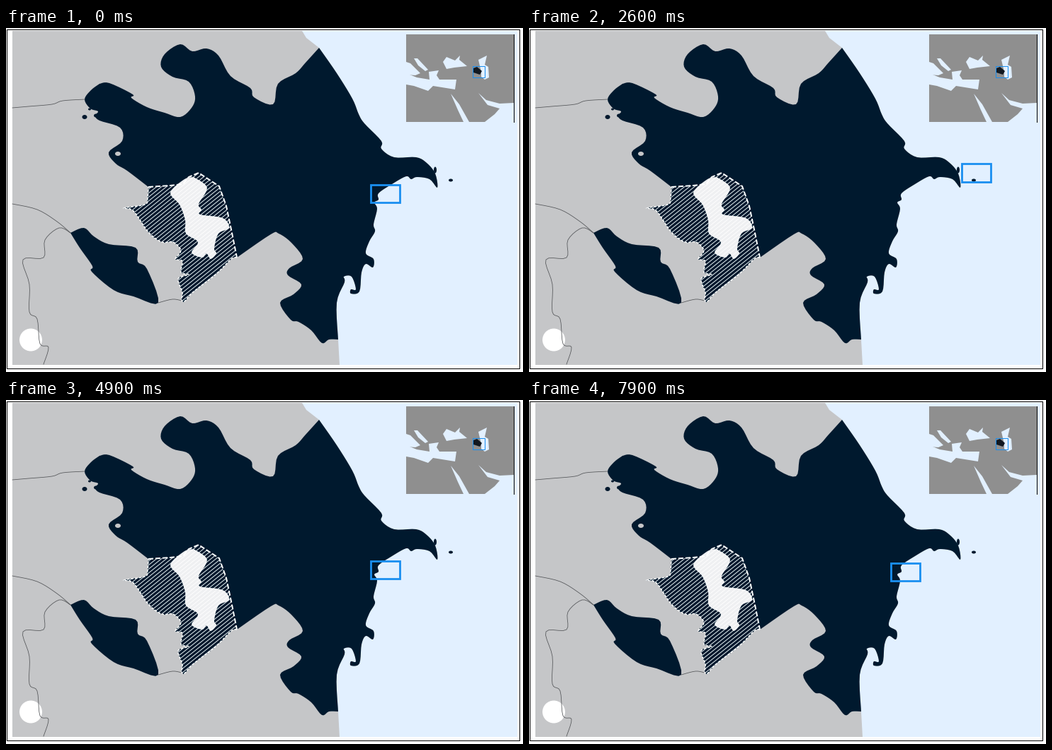
Animation, 730 px wide and 487 px high, one loop 8 s. Source, as a matplotlib script:

```python
import matplotlib.pyplot as plt
import numpy as np
from matplotlib.animation import FuncAnimation
from matplotlib.patches import Circle, Ellipse, Polygon, Rectangle

W, H, DPI = 730, 487, 100
FRAMES, STEP = 80, 100
PX = 72 / DPI

SEA, LAND, NAVY = "#e2f0ff", "#c5c6c8", "#00192e"
PALE, BLUE, GREY = "#eff0f2", "#1a8ff0", "#8f8f8f"


def curve(points, n=5):
    """Catmull-Rom curve through the points."""
    p = np.array([points[0], *points, points[-1]], float)
    t = np.linspace(0, 1, n, endpoint=False)[:, None]
    parts = []
    for a, b, c, d in zip(p, p[1:], p[2:], p[3:]):
        parts.append(b + 0.5 * t * (c - a + t * (2 * a - 5 * b + 4 * c - d
                                                 + t * (3 * (b - c) + d - a))))
    return [tuple(q) for q in np.vstack(parts + [p[-1:]])]


def ring(points):
    return curve(points + points[:1])


EAST = curve([(442, 28), (467, 64), (489, 100), (498, 122), (506, 135),
              (530, 160), (530, 171), (548, 183), (579, 183), (594, 191),
              (606, 206), (609, 226), (598, 214), (580, 211), (572, 214),
              (565, 210), (545, 221), (526, 234), (526, 243), (520, 247),
              (524, 256), (519, 278), (521, 288), (513, 302), (508, 319),
              (519, 327), (518, 339), (508, 334), (502, 346), (499, 373),
              (487, 376), (487, 370), (494, 370), (488, 352), (477, 352),
              (478, 360), (467, 389), (469, 441)])
SOUTH = curve([(469, 441), (456, 441), (446, 446), (431, 428), (413, 416),
               (402, 413), (387, 389), (406, 377), (417, 363), (398, 350),
               (400, 340), (419, 327), (403, 304), (385, 291), (374, 292),
               (326, 325)])
HATCH_EDGE = curve([(326, 325), (318, 327), (296, 349), (264, 374), (252, 387),
                    (248, 385), (249, 374), (243, 355), (258, 349), (247, 346),
                    (249, 330), (239, 327), (247, 315), (236, 303), (220, 303),
                    (201, 289), (180, 259), (166, 255), (196, 250), (200, 241),
                    (201, 225)])
WEST = curve([(201, 225), (171, 202), (155, 192), (145, 176), (164, 160),
              (161, 141), (132, 131), (126, 124), (130, 118), (119, 114),
              (111, 101), (120, 88), (132, 79)])
NORTH = curve([(132, 79), (146, 78), (179, 94), (177, 99), (199, 112), (224, 120),
               (246, 126), (262, 113), (267, 97), (258, 76), (235, 69), (219, 55),
               (224, 37), (246, 23), (263, 33), (283, 29), (300, 39), (317, 68),
               (345, 85), (350, 98), (377, 108), (384, 79), (409, 64), (423, 49),
               (442, 28)])
EXCLAVE = ring([(91, 290), (110, 283), (124, 295), (145, 306), (183, 311),
                (186, 331), (199, 341), (215, 389), (180, 380), (152, 371),
                (121, 345), (122, 337), (104, 311)])
ENCLAVE = ring([(265, 211), (284, 226), (272, 249), (276, 257), (274, 264),
                (306, 269), (315, 283), (300, 291), (294, 312), (297, 319),
                (289, 327), (283, 319), (277, 325), (262, 318), (271, 303),
                (254, 291), (253, 272), (245, 250), (232, 233), (252, 214)])
DASHED = [(201, 225), (232, 223), (250, 221), (258, 211), (272, 205), (301, 224),
          (311, 252), (319, 290), (326, 325)]

fig = plt.figure(figsize=(W / DPI, H / DPI), dpi=DPI, facecolor="white")
ax = fig.add_axes([0, 0, 1, 1])
ax.set(xlim=(0, W), ylim=(H, 0))
ax.axis("off")


def area(points, color):
    return ax.add_patch(Polygon(points, fc=color, lw=0))


def line(points, color, width, **kw):
    return ax.plot(*zip(*points), color=color, lw=width * PX, **kw)[0]


def box(x0, y0, x1, y1, fill="none", edge="none", width=0):
    return ax.add_patch(Rectangle((x0, y0), x1 - x0, y1 - y0, fc=fill, ec=edge,
                                  lw=width * PX, joinstyle="miter"))


def spot(x, y, w, h, color=NAVY):
    ax.add_patch(Ellipse((x, y), w, h, fc=color, lw=0))


def border(*points):
    line(curve(points), "#55575a", 0.8)


def draw_map():
    box(0.5, 1.5, 724.5, 481.5, edge="black", width=1)
    box(9, 4, 722, 477, SEA)
    area([(9, 4), (418, 4), (424, 14)] + EAST + [(471, 477), (9, 477)], LAND)
    border((9, 113), (32, 111), (65, 108), (80, 103), (111, 101))
    border((9, 249), (44, 257), (72, 274), (91, 290))
    border((91, 290), (75, 283), (55, 300), (53, 325), (24, 328), (33, 363),
           (33, 402), (44, 412), (48, 447), (60, 452), (53, 476))
    border((215, 389), (235, 384), (248, 386))
    area(EAST + SOUTH + HATCH_EDGE + WEST + NORTH, NAVY)
    area(EXCLAVE, NAVY)
    spot(111, 126, 7, 6)
    spot(118, 115, 4, 3)
    spot(127, 124, 6, 5)
    spot(158, 178, 8, 6, LAND)
    spot(606, 201, 4, 9)
    spot(628, 215.5, 6, 4)


def draw_hatched_zone():
    zone = area(HATCH_EDGE + DASHED, NAVY)
    for c in np.arange(330, 650, 5.6):
        line([(150, c - 100), (340, c - 252)], "white", 0.9).set_clip_path(zone)
    line(HATCH_EDGE, "white", 1.4, ls=(0, (2.5, 1.5)))
    line(DASHED, "white", 2, ls=(0, (3.5, 1.5)), dash_capstyle="butt")
    area(ENCLAVE, PALE)


def draw_inset():
    frame = box(565, 9, 717, 133, GREY)

    def sea(*points):
        area(points, SEA).set_clip_path(frame)

    sea((565, 64), (580, 70), (598, 73), (597, 62), (611, 60), (608, 67),
        (612, 73), (636, 73), (634, 87), (603, 82), (596, 89), (576, 82), (565, 80))
    sea((565, 48), (571, 50), (585, 64), (578, 67), (565, 66))
    sea((576, 43), (581, 43), (596, 59), (592, 61), (582, 53))
    sea((617, 48), (622, 41), (634, 46), (641, 39), (640, 45), (651, 54),
        (633, 56), (622, 58))
    sea((667, 45), (679, 39), (676, 52), (681, 55), (682, 70), (676, 73),
        (671, 69), (671, 62))
    sea((628, 93), (640, 108), (654, 133), (646, 133), (638, 116))
    sea((667, 92), (678, 102), (697, 107), (717, 106), (717, 133), (676, 133),
        (690, 122), (697, 114), (680, 109))
    line([(716.5, 9), (716.5, 133)], "black", 1)
    area([(660, 57), (665, 55), (672, 61), (669, 66), (660, 63)], "#111820")
    box(658.5, 53.5, 675.5, 69.5, edge=BLUE, width=1)


draw_map()
draw_hatched_zone()
draw_inset()
ax.add_patch(Circle((35, 441.5), 16, fc="white", lw=0))

# Orbit angle in degrees, clockwise on screen, with short rests.
KEYS = [0, 1, 10, 15, 19, 26, 28, 29, 38, 40, 49, 61, 65, 68, 69, 78, 79]
ANGLES = [113.6, 113.6, 350, 481.8, 602, 720, 792, 792, 1011, 1139, 1551.8,
          2090.4, 2270, 2410, 2410, 2642, 2633.3]
BOX_W, BOX_H = 41, 25.5
locator = box(0, 0, BOX_W, BOX_H, edge=BLUE, width=2.8)


def update(i):
    angle = np.radians(np.interp(i, KEYS, ANGLES))
    x = 562 + (65 + 0.155 * i) * np.cos(angle)
    y = 205.2 + (32 + 0.125 * i) * np.sin(angle)
    locator.set_xy((x - BOX_W / 2, y - BOX_H / 2))
    return [locator]


anim = FuncAnimation(fig, update, frames=FRAMES, interval=STEP, repeat=True,
                     repeat_delay=0, blit=False)
plt.show()
```
